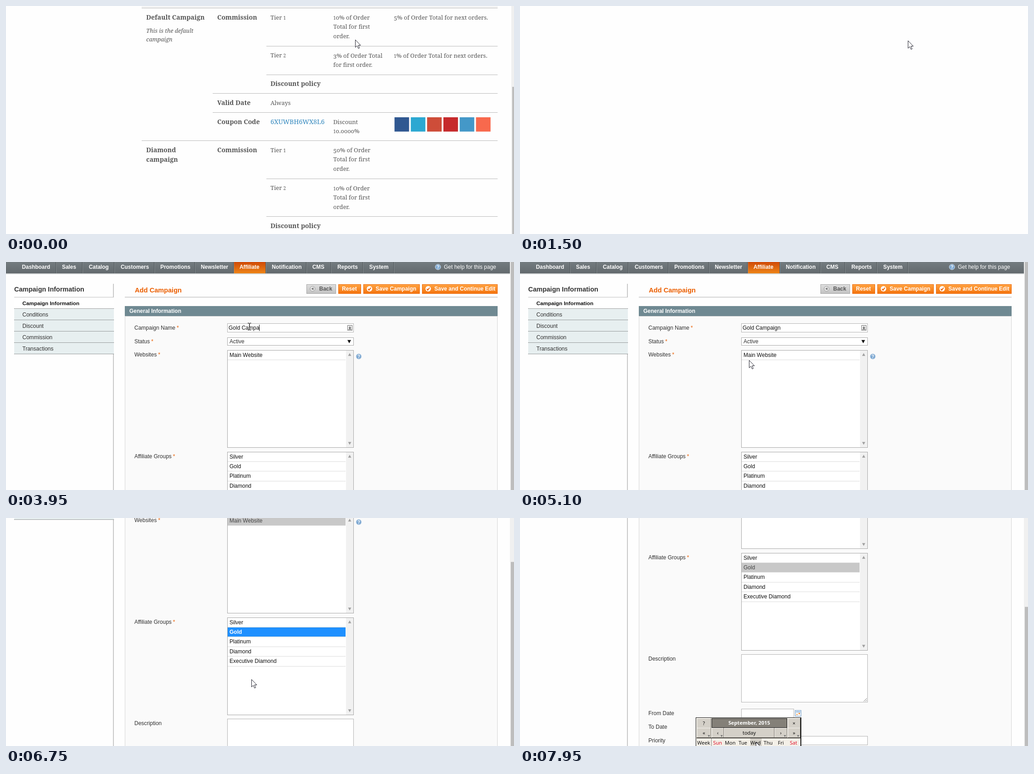
An HTML page with a canvas that plays this animation: 1116 px wide and 502 px high, repeating every 8 s.

```html
<!DOCTYPE html>
<html lang="en">
<head>
<meta charset="utf-8">
<title>Campaign setup</title>
<style>
html, body { margin: 0; width: 100%; height: 100%; overflow: hidden; background: #fff; }
canvas { display: block; }
</style>
</head>
<body>
<canvas id="stage" width="1116" height="502"></canvas>
<script>
const g = document.getElementById('stage').getContext('2d');
const SANS = '"Liberation Sans", Arial, sans-serif';
const SERIF = '"Noto Serif", serif';
const CAL = '"Noto Sans", sans-serif';
const ORANGE = '#eb5e00', INK = '#2f2f2f';

// ---------- basic drawing ----------
function rect(x, y, w, h, fill, stroke) {
  if (fill) { g.fillStyle = fill; g.fillRect(x, y, w, h); }
  if (stroke) { g.strokeStyle = stroke; g.lineWidth = 1; g.strokeRect(x + .5, y + .5, w - 1, h - 1); }
}
function fade(y, h, top, bottom) {
  const f = g.createLinearGradient(0, y, 0, y + h);
  f.addColorStop(0, top);
  f.addColorStop(1, bottom);
  return f;
}
// y is the middle of the capitals; baselines sit on whole pixels
function text(s, x, y, { size = 12, bold, color = INK, align = 'left', font = SANS, italic } = {}) {
  g.font = `${italic ? 'italic ' : ''}${bold ? 'bold ' : ''}${size}px ${font}`;
  g.textAlign = align;
  g.fillStyle = color;
  g.fillText(s, x, Math.round(y + size * .355));
}
function poly(points, fill, stroke) {
  g.beginPath();
  points.forEach(([x, y]) => g.lineTo(x, y));
  g.closePath();
  if (fill) { g.fillStyle = fill; g.fill(); }
  if (stroke) { g.strokeStyle = stroke; g.lineWidth = 1; g.stroke(); }
}
function disc(x, y, r, fill, stroke) {
  g.beginPath();
  g.arc(x, y, r, 0, 7);
  if (fill) { g.fillStyle = fill; g.fill(); }
  if (stroke) { g.strokeStyle = stroke; g.lineWidth = 1; g.stroke(); }
}
const triangle = (x, y, r, color = '#111', dir = 1) =>
  poly([[x - r, y - r * .8 * dir], [x + r, y - r * .8 * dir], [x, y + r * dir]], color);

// ---------- widgets ----------
const field = (x, y, w, h) => rect(x, y, w, h, '#fff', '#b3b3b3');
function select(x, y, w, h, label = '') {
  rect(x, y, w, h, '#fff', '#a9a9a9');
  text(label, x + 5, y + h / 2);
  triangle(x + w - 10, y + h / 2, 4);
}
function button(x, y, w, label, tx, icon, style = 'normal') {
  const h = 21;
  const [top, bottom, edge, ink] = {
    normal: ['#ffa544', '#f4720c', '#ed6502', '#fff'],
    hover: ['#fbc796', '#f57d1d', '#ed6502', '#fff'],
    gray: ['#dedede', '#c2c2c2', '#a5a5a5', '#555']
  }[style];
  rect(x, y, w, h, fade(y, h, top, bottom), edge);
  const cx = x + 13.5, cy = y + 10;
  if (icon === 'back') {
    disc(cx, cy, 5.5, '#e6e6e6', '#999');
    poly([[cx - 3, cy], [cx + 2, cy - 3], [cx + 2, cy + 3]], '#777');
  } else if (icon === 'plus') {
    disc(cx, cy, 5.5, null, '#fff');
    rect(cx - 3, cy - 1, 6, 2, '#fff');
    rect(cx - 1, cy - 3, 2, 6, '#fff');
  } else if (icon === 'check') {
    disc(cx, cy, 6, '#fff');
    g.beginPath();
    g.moveTo(cx - 3, cy); g.lineTo(cx - 1, cy + 3); g.lineTo(cx + 3, cy - 2.5);
    g.strokeStyle = ORANGE; g.lineWidth = 2; g.stroke();
  }
  text(label, tx, y + 9.7, { bold: true, color: ink });
}
function helpIcon(x, y) {
  disc(x, y, 6, '#7fa9d2', '#d5e3f0');
  text('?', x, y, { size: 10, bold: true, color: '#fff', align: 'center' });
}
function dateIcon(x, y) {
  rect(x - 7, y - 7, 14, 14, '#dceaf8', '#7da2c8');
  rect(x - 5, y - 4, 10, 9, '#fff');
  rect(x - 5, y - 4, 10, 2, '#8fb5dd');
  rect(x + 1, y - 1, 3, 3, '#e98a35');
  rect(x - 4, y + 1, 3, 3, '#e9b27c');
}
function scrollbar(x, top) {
  rect(x, 0, 1116 - x, 502, '#f0f0f0');
  rect(x + 2, top, 1114 - x, 502 - top, '#bdbdbd');
}

// ---------- storefront ----------
// Old-style numerals: 0-2 at x-height, 3-5 hanging below the baseline.
function serif(s, x, y, opts = {}) {
  const o = { size: opts.bold ? 14.1 : 12.9, color: '#555', font: SERIF, ...opts };
  for (const part of s.match(/[0-2]|[3-5]|[^0-5]+/g)) {
    let dy = 0, size = o.size, glyph = part;
    if (part === '0') glyph = 'o';
    else if (/[12]/.test(part)) { size *= .78; dy = 1.1; }
    else if (/[3-5]/.test(part)) dy = 2.5;
    text(glyph, x, y + dy, { ...o, size });
    x += g.measureText(glyph).width;
  }
}
const serifLines = (lines, x, y, opts) => lines.forEach((s, i) => serif(s, x, y + i * 20.8, opts));

function storefront() {
  rect(298, 0, 782, 4, '#f5f5f5');
  for (const [x, y] of [[298, 4], [572, 88], [572, 151], [454, 192], [454, 234], [298, 296], [572, 380], [572, 463]])
    rect(x, y, 1080 - x, 1, '#b9b9b9');
  const bold = { bold: true }, small = { italic: true, size: 12.6 };
  serif('Default Campaign', 308, 25, bold);
  serif('This is the default', 308, 55, small);
  serif('campaign', 308, 74, small);
  serifLines(['Diamond', 'campaign'], 308, 317, bold);
  for (const y of [25, 317]) {
    serif('Commission', 464, y, bold);
    serif('Tier 1', 581, y);
    serif('Tier 2', 581, y + 83.5);
  }
  serif('Discount policy', 581, 171, bold);
  serif('Discount policy', 581, 484, bold);
  serif('Valid Date', 464, 213, bold);
  serif('Always', 581, 213);
  serif('Coupon Code', 464, 255, bold);
  text('6XUWBH6WX8L6', 581, 255, { size: 14.1, color: '#2f86bd', font: SERIF });
  const first = ['Total for first', 'order.'];
  serifLines(['10% of Order', ...first], 719, 25);
  serifLines(['3% of Order Total', 'for first order.'], 719, 109);
  serifLines(['Discount', '10.0000%'], 719, 255);
  serifLines(['50% of Order', ...first], 719, 317);
  serifLines(['10% of Order', ...first], 719, 401);
  serif('5% of Order Total for next orders.', 852, 25);
  serif('1% of Order Total for next orders.', 852, 109);
  ['#305891', '#2ca8d2', '#ce4d39', '#c62a2c', '#4498c8', '#f8694d']
    .forEach((c, i) => rect(853.5 + i * 35.8, 245, 32, 31.5, c));
  scrollbar(1110, 178);
}

// ---------- admin ----------
const MENU = [['Dashboard', 35, 109], ['Sales', 123, 167], ['Catalog', 182, 237], ['Customers', 252, 325],
  ['Promotions', 339, 414], ['Newsletter', 428, 499], ['Affiliate', 513, 570], ['Notification', 584, 659],
  ['CMS', 673, 713], ['Reports', 728, 783], ['System', 798, 851]];

function menuBar(width, helpX) {
  rect(0, 0, width, 25, fade(0, 25, '#737b7f', '#636a6e'));
  rect(0, 25, width, 2, '#d2d5d6');
  rect(500, 0, 70, 25, fade(0, 25, '#cf4a08', '#ee8417'));
  for (const [label, x, end] of MENU) {
    text(label, x, 10.6, { size: 11.9, bold: true, color: '#fff' });
    rect(end, 0, 1, 25, '#4d5458');
    rect(end + 1, 0, 1, 25, '#878e91');
  }
  helpIcon(helpX, 11);
  text('Get help for this page', helpX + 13, 10.6, { color: '#fff' });
}

function campaignGrid(hover) {
  menuBar(1116, 966);
  text('Campaign Manager', 40, 62, { size: 14.4, bold: true, color: ORANGE });
  rect(18, 76, 1079, 3, '#dfdfdf');
  button(979, 49, 118, 'Add Campaign', 1005, 'plus', hover ? 'hover' : 'normal');

  [['Page', 18], ['of 1 pages', 126], ['|', 192], ['View', 204], ['per page', 292], ['|', 346],
   ['Total 2 records found', 359]].forEach(([s, x]) => text(s, x, 106.5));
  for (const [x, d] of [[52, -1], [107, 1]]) {
    rect(x, 100, 13, 13, '#f8f8f8', '#d6d6d6');
    poly([[x + 6.5 + 2 * d, 106.5], [x + 6.5 - 2 * d, 104], [x + 6.5 - 2 * d, 109]], '#bbb');
  }
  field(71, 97, 31, 20);
  text('1', 76, 107);
  select(237, 98, 48, 18, '20');
  button(954, 97, 81, 'Reset Filter', 962);
  button(1040, 97, 57, 'Search', 1048);

  rect(18, 124, 1079, 26, fade(124, 26, '#dedede', '#c6c6c6'), '#cbcbcb');
  const tiny = { size: 10.45 }, link = { ...tiny, color: ORANGE };
  [['Select All', 26], ['Unselect All', 90], ['Select Visible', 166], ['Unselect Visible', 248]]
    .forEach(([s, x]) => text(s, x, 137.5, link));
  [79, 154, 237, 331].forEach(x => text('|', x, 137.5, tiny));
  text('0 items selected', 343, 137.5, tiny);
  text('Actions', 880, 137, tiny);
  select(917, 128, 105, 18);
  button(1027, 127, 56, 'Submit', 1036);

  rect(18, 150, 1079, 25, fade(150, 25, '#f7f7f7', '#d9d9d9'));
  rect(80, 153, 99, 21, '#fde8c5');
  g.setLineDash([1, 1]);
  rect(80, 153, 99, 21, null, '#8b7a5c');
  g.setLineDash([]);
  [['Campaign ID', 88], ['Name', 189], ['Date Start', 306], ['Date Expire', 505], ['Status', 704],
   ['Website', 803], ['Priority', 1002]]
    .forEach(([s, x]) => text(s, x, 163.5, { size: 10.9, bold: true, color: '#444d55' }));
  rect(171, 158, 1, 10, ORANGE);
  triangle(171.5, 167, 3, ORANGE);

  rect(18, 175, 1079, 56, '#d3e1e4', '#c6d2d5');
  for (let x = 20; x < 1096; x += 3) rect(x, 176, 1, 54, '#cbdce0');
  rect(18, 231, 1079, 23, '#f6f6f6');
  for (const y of [231, 254, 276]) rect(18, y, 1079, 1, '#dadfe0');
  for (const x of [18, 75, 183, 300, 499, 698, 797, 996, 1096]) {
    rect(x, 150, 1, 81, '#b9c4c8');
    rect(x, 231, 1, 46, '#dadfe0');
  }
  select(22, 180, 49, 19, 'Any');
  [[82, 123], [307, 369], [506, 568]].forEach(([x, fx], i) => ['From:', 'To :'].forEach((s, j) => {
    const y = 189 + j * 23;
    text(s, x, y, { size: 11.6, bold: true });
    field(fx, y - 9, 56, 20);
    if (i) dateIcon(x + 43, y + 1);
  }));
  field(188, 180, 108, 20);
  select(702, 180, 91, 19);
  select(802, 180, 190, 19);
  field(1001, 180, 91, 20);

  [['2', 'Diamond campaign', 'Sep 22, 2015', 'Oct 31, 2015'], ['1', 'Default Campaign', '', '']]
    .forEach(([id, name, from, to], i) => {
      const y = 242.5 + i * 23;
      rect(41, Math.round(y - 6), 12, 12, '#f1f1f1', '#aaa');
      text(id, 179, y, { align: 'right', color: i ? '#2a5c8f' : INK });
      [[name, 188], [from, 305], [to, 504], ['Active', 703], ['Main Website', 802], ['0', 1001]]
        .forEach(([s, x]) => text(s, x, y));
    });
}

function listBox(y, options, picked, focused) {
  rect(486, y, 278, 215, '#fff', '#a6a6a6');
  rect(747, y + 1, 16, 213, '#f1f1f1');
  triangle(755, y + 10, 3.5, '#a0a0a0', -1);
  triangle(755, y + 205, 3.5, '#a0a0a0');
  options.forEach((s, i) => {
    const top = y + 1 + i * 21.4, on = i === picked;
    if (on) rect(487, Math.round(top - .4), 259, 21, focused ? '#1e90ff' : '#c8c8c8');
    rect(487, Math.round(top + 20), 259, 1, '#dcdcdc');
    text(s, 491, top + 9.4, { color: on ? (focused ? '#fff' : '#444') : '#111', bold: on && focused });
  });
}

function label(s, y, required) {
  text(s, 282, y);
  if (required) text('*', 282 + g.measureText(s).width + 3, y, { color: ORANGE });
}

function campaignForm(t, scroll) {
  g.save();
  g.translate(0, -scroll);
  menuBar(1107, 949);

  rect(235, 48, 2, 900, '#c9c9c9');
  text('Campaign Information', 18, 60, { size: 14.5, bold: true, color: '#333' });
  rect(18, 77, 218, 1, '#bdbdbd');
  rect(18, 78, 220, 25, '#fff');
  rect(18, 103, 219, 100, '#e7eff0');
  ['Campaign Information', 'Conditions', 'Discount', 'Commission', 'Transactions'].forEach((s, i) => {
    text(s, 36, 91 + i * 24.9, { bold: !i, size: i ? 12 : 11.8, color: i ? INK : '#111' });
    for (let x = 18; x < 237; x += 2) rect(x, 102 + i * 25, 1, 1, '#444');
  });

  text('Add Campaign', 283, 62, { size: 14.6, bold: true, color: ORANGE });
  button(660, 49, 65, 'Back', 688, 'back', 'gray');
  button(730, 49, 50, 'Reset', 738);
  button(785, 49, 124, 'Save Campaign', 812, 'check');
  button(914, 49, 166, 'Save and Continue Edit', 941, 'check');
  rect(261, 76, 819, 3, '#dfdfdf');
  rect(261, 119, 819, 800, '#fafafa', '#d6d6d6');
  rect(261, 97, 819, 22, '#6f8992');
  text('General Information', 271, 108, { bold: true, color: '#fff' });

  label('Campaign Name', 145, true);
  field(486, 135, 278, 20);
  rect(750, 139, 11, 12, '#eee', '#777');
  rect(755, 141, 1, 5, '#555');
  triangle(755.5, 146, 2.5, '#555');
  rect(752, 148, 7, 1, '#555');
  typedName(t);

  label('Status', 175, true);
  select(486, 166, 278, 18, 'Active');
  label('Websites', 204, true);
  const group = t >= 5850, site = t >= 5250;
  listBox(194, ['Main Website'], site ? 0 : -1, !group);
  helpIcon(775, 208);
  label('Affiliate Groups', 427.5, true);
  listBox(418, ['Silver', 'Gold', 'Platinum', 'Diamond', 'Executive Diamond'], group ? 1 : -1, t < 7650);

  label('Description', 651);
  field(486, 641, 278, 106);
  for (const d of [3, 7]) {
    g.beginPath();
    g.moveTo(762 - d, 745); g.lineTo(762, 745 - d);
    g.strokeStyle = '#777'; g.lineWidth = 1; g.stroke();
  }
  [['From Date', 771], ['To Date', 801]].forEach(([s, y]) => {
    label(s, y);
    field(486, y - 10, 116, 20);
    dateIcon(611, y);
  });
  label('Priority', 831);
  field(486, 821, 278, 20);
  g.restore();
  scrollbar(1107, Math.max(0, -42 + .697 * scroll));
}

const KEYS = [3050, 3150, 3300, 3350, 3400, 3550, 3650, 3750, 3850, 3950, 4050, 4200, 4300];
function typedName(t) {
  const typed = 'Gold Campaign'.slice(0, KEYS.filter(k => k <= t).length);
  text(typed, 489, 145, { color: '#111' });
  const caret = (t >= 2350 && t < 2750) || (t >= 3050 && t < 4750);
  if (caret) rect(Math.round(489 + g.measureText(typed).width), 138, 1, 14, '#111');
}

function calendar(hoverDay) {
  const cell = (x, y, w, s, tx = x + w / 2) => {
    rect(x, y, w, 22, '#d4d0c8');
    rect(x, y, w, 1, '#f6f4f0');
    rect(x, y, 1, 22, '#f6f4f0');
    rect(x, y + 21, w, 1, '#77736b');
    rect(x + w - 1, y, 1, 22, '#77736b');
    text(s, tx, y + 11, { size: 11, font: CAL, align: 'center', color: '#111' });
  };
  rect(386, 439, 232, 63, '#f4f0e8');
  cell(388, 441, 32, '?');
  rect(421, 441, 166, 21, '#848078', '#111');
  text('September, 2015', 503.5, 451.5, { size: 11.2, bold: true, font: CAL, color: '#fff', align: 'center' });
  cell(588, 441, 28, '×');
  [[388, 32, '«'], [421, 27, '‹'], [448, 111, 'today'], [559, 28, '›'], [588, 28, '»']].forEach(([x, w, s]) => {
    cell(x, 462, w, s);
    if (w < 50) triangle(x + w - 5, 480, 2.5, '#777');
  });
  rect(388, 484, 228, 1, '#111');
  if (hoverDay) rect(506, 485, 25, 17, '#d4d0c8');
  rect(420, 485, 1, 17, '#888');
  ['Week', 'Sun', 'Mon', 'Tue', 'Wed', 'Thu', 'Fri', 'Sat'].forEach((s, i) =>
    text(s, i ? 406.2 + i * 27.8 : 403.5, 495.5,
      { size: 11, font: CAL, align: 'center', color: s[0] === 'S' ? '#e0102a' : '#111' }));
  rect(386, 439, 232, 70, null, '#111');
  rect(616, 439, 2, 63, '#111');
}

// ---------- pointer ----------
const PATH = [[100, 767, 74], [900, 1026, 59], [1150, 1026, 59], [1500, 852, 76], [1800, 746, 96],
  [1950, 465, 172], [2100, 527, 115], [2250, 527, 115], [2400, 534, 142], [4900, 534, 142], [5100, 503, 216],
  [5250, 507, 207], [5350, 507, 207], [5750, 509, 449], [5850, 509, 449], [6200, 536, 440], [6600, 539, 357],
  [6750, 539, 355], [7100, 548, 372], [7600, 608, 428], [7700, 608, 428], [7950, 518, 493]];

function pointerAt(t) {
  const i = PATH.findIndex(p => p[0] > t);
  if (i < 0) return PATH[PATH.length - 1].slice(1);
  if (!i) return PATH[0].slice(1);
  const [a, ax, ay] = PATH[i - 1], [b, bx, by] = PATH[i];
  const k = (t - a) / (b - a), e = k * k * (3 - 2 * k);
  return [ax + (bx - ax) * e, ay + (by - ay) * e];
}
const ARROW = [[0, 0], [0, 16.5], [3.8, 13], [6.5, 19], [9, 18], [6.5, 12], [11.5, 12]];
const HAND = [[-2, 1], [0, -1], [2, 1], [2, 7], [5, 7], [8, 8.5], [10, 10], [10, 15], [8, 21], [0, 21], [-4, 15],
  [-7, 11], [-5, 10], [-2, 13]];
function pointer(shape, x, y) {
  g.save();
  g.translate(Math.round(x) + .5, Math.round(y) + .5);
  if (shape === 'text') {
    rect(-.5, -7.5, 1.4, 15, '#111');
    for (const py of [-8.5, 7]) { rect(-3.5, py, 3, 1, '#111'); rect(1, py, 3, 1, '#111'); }
  } else {
    poly(shape === 'hand' ? HAND : ARROW, '#fff', '#20202c');
    if (shape === 'hand') for (const px of [2, 5, 8]) rect(px, 8, 1, 4, '#20202c');
  }
  g.restore();
}

// ---------- timeline ----------
const scrollAt = t => t < 6650 ? 0 : t < 6700 ? 100 : t < 6950 ? 199 : t < 7100 ? 298 : 341;

function draw(t) {
  const [x, y] = pointerAt(t);
  let shape = 'arrow';
  rect(0, 0, 1116, 502, '#fefefe');
  if (t < 500) storefront();
  else if (t < 1300) {
    const hover = x >= 979 && y < 70;
    campaignGrid(hover);
    if (hover) shape = 'hand';
  } else if (t >= 1650) {
    campaignForm(t, scrollAt(t));
    if (t >= 2350 && t < 4950) shape = 'text';
    if (t >= 7700) calendar(y > 485 && x > 506 && x < 531);
  }
  pointer(shape, x, y);
}

const start = performance.now();
function tick() {
  const t = (performance.now() - start) % 8000;
  draw(Math.floor(t / 50) * 50);
  requestAnimationFrame(tick);
}
tick();
</script>
</body>
</html>
```
